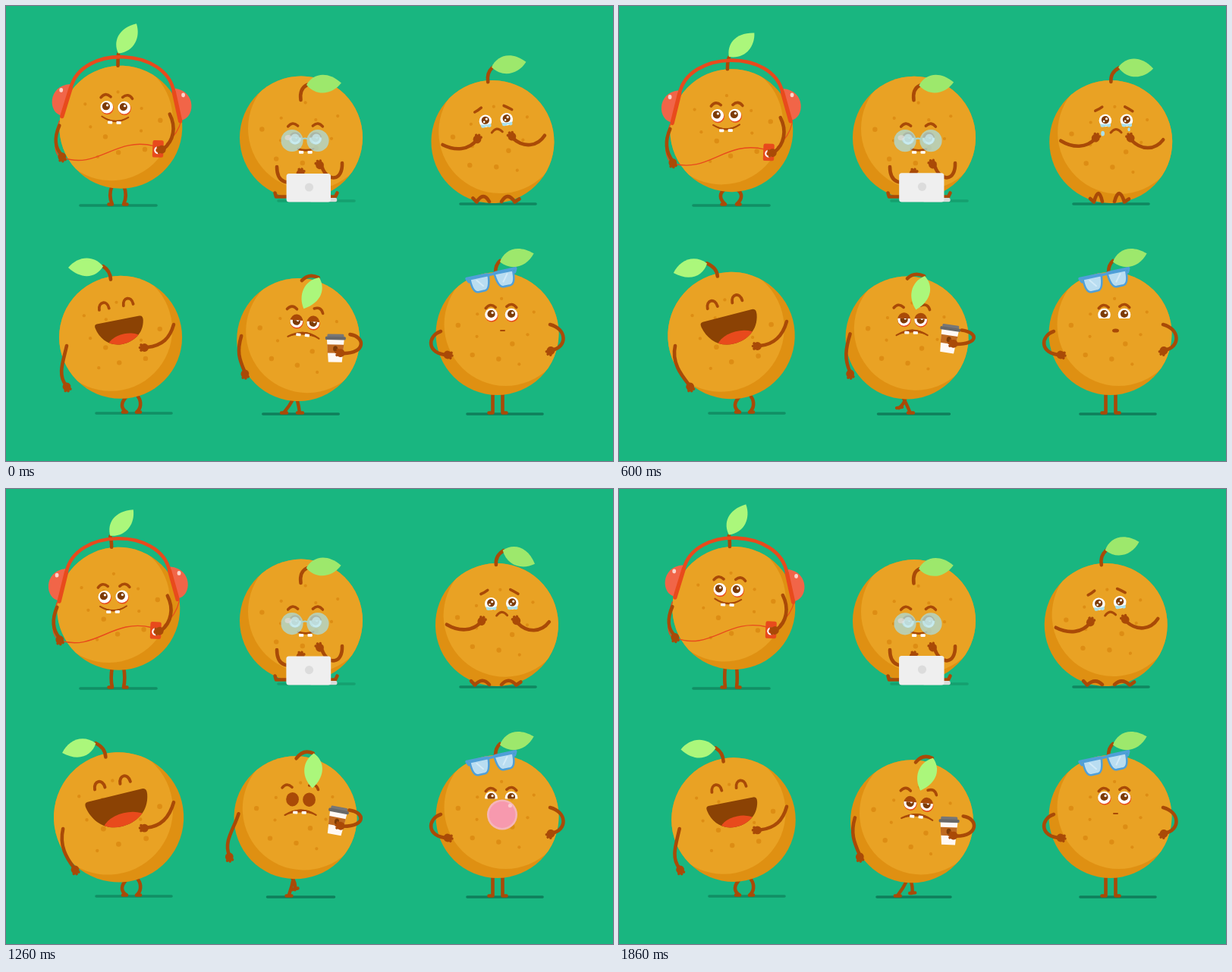
Animation, 800 px wide and 600 px high, one loop 1.92 s. Source, as an HTML page with a canvas:

```html
<!DOCTYPE html>
<html lang="en">
<head>
<meta charset="utf-8">
<title>Six oranges</title>
<style>
  html, body { margin: 0; width: 100%; height: 100%; overflow: hidden; background: #19b680; }
  canvas { display: block; width: 800px; height: 600px; }
</style>
</head>
<body>
<canvas id="stage" width="800" height="600"></canvas>
<script>
const ctx = document.getElementById('stage').getContext('2d');
const LOOP = 1920, STEP = 60, LEAD = 20;
const BOB = 480, SWAY = 960, TYPE = 640;
const BROWN = '#a94a07', RED = '#e84a1c', WHITE = '#fff', BLUE = '#4f9fd8';
const LIME = '#abf77b', GREEN = '#9de86c', TEAR = '#a9dfea';
let t = 0;

// Timing helpers
const wave = (mid, amp, period, peak = 0) => mid + amp * Math.cos(2 * Math.PI * (t - peak) / period);
const part = (from, to, time = t) => Math.min(1, Math.max(0, (time - from) / (to - from)));
const ramp = (from, to, time = t) => {
  const u = part(from, to, time);
  return u * u * (3 - 2 * u);
};
const arch = (from, to) => Math.sin(Math.PI * part(from, to));

// Drawing helpers
function line(d, width = 4.6, color = BROWN) {
  ctx.lineWidth = width;
  ctx.strokeStyle = color;
  ctx.stroke(new Path2D(d));
}
function shape(d, color) {
  ctx.fillStyle = color;
  ctx.fill(new Path2D(d));
}
function dot(x, y, rx, color, ry = rx) {
  ctx.fillStyle = color;
  ctx.beginPath();
  ctx.ellipse(x, y, rx, ry, 0, 0, 7);
  ctx.fill();
}
function box(x, y, w, h, r, color) {
  ctx.fillStyle = color;
  ctx.beginPath();
  ctx.roundRect(x, y, w, h, r);
  ctx.fill();
}
function at(x, y, deg, draw, sx = 1, sy = sx) {
  ctx.save();
  ctx.translate(x, y);
  ctx.rotate(deg * Math.PI / 180);
  ctx.scale(sx, sy);
  draw();
  ctx.restore();
}
function clipped(d, draw) {
  ctx.save();
  ctx.clip(new Path2D(d));
  draw();
  ctx.restore();
}
function mirrored(draw) {
  for (const s of [1, -1]) at(0, 0, 0, () => draw(s), s, 1);
}

// Shared parts
const ground = (x1, x2, y, color = '#118f64') => line(`M${x1 + 2},${y}H${x2 - 2}`, 3.6, color);

function body(side) {
  dot(0, 0, 81, '#df9012');
  clipped('M-81,0a81,81 0 1 1 162,0a81,81 0 1 1 -162,0', () => {
    if (side > 0) dot(-13, -10, 81, '#e9a224');
    else dot(11, -12, 81, '#e9a224');
  });
  // Freckles wind outwards by the golden angle
  for (let i = 0; i < 11; i++) {
    const a = 2.4 * i + .6, r = 24 + 3.2 * i;
    dot(-side * r * Math.cos(a), r * Math.sin(a), i % 3 ? 2.1 : 3.2, '#dd8d14');
  }
}
function leaf(x, y, deg, color) {
  at(x, y, deg, () => shape('M0,0C9,-14 28,-18 46,0C34,14 13,17 0,0Z', color));
}
function hand(x, y, deg) {
  at(x, y, deg, () => {
    dot(0, 0, 5.4, BROWN);
    line('M0,0L4.5,-3.5M0,0L6,0M0,0L4.5,3.5', 3.6);
  });
}
function eye(x, y, px = -1, py = -1, red = true) {
  if (red) dot(x + .6, y + 1.4, 8.4, RED);
  dot(x, y, 8.3, WHITE);
  dot(x + px, y + py, 5.1, '#7d3b06');
  dot(x + px + 1.6, y + py - 1.4, 1.6, WHITE);
}
const brow = (x, y, deg = 0) => at(x, y, deg, () => line('M-6.5,2Q0,-5 6.5,2', 3.6));
const teeth = (x, y) => [0, 11.5].forEach(dx => box(x + dx, y, 6.2, 3.7, 1, WHITE));

function listener() {
  const x = wave(149.2, 2.3, BOB, 450), y = wave(160.2, 4, BOB, 130), tilt = wave(0, 2.5, BOB, 450);
  ground(96, 200, 263);
  const bow = (y - 156) * 1.5;
  for (const s of [-1, 1]) {
    const hx = 147.5 + s * 7.5;
    line(`M${hx},${y + 77}Q${hx + s * bow},250 ${hx},261.5h${s * 4.5}`);
  }
  const lx = wave(142.7, 5.8, BOB, 30), ly = wave(63.5, 3.6, BOB, 140);
  const foot = x - 6.5 + (lx - 142.7) / 2;

  at(x, y, tilt, () => body(1));
  line(`M${foot},${y - 81}Q${foot},${ly + 6} ${lx},${ly + 1}`);
  leaf(lx, ly, wave(-50, 11, BOB, 190), LIME);
  at(x, y, tilt, () => {
    mirrored(() => {
      shape('M-78,-12C-97,-14 -99,-51 -69,-54Z', '#f16548');
      dot(-80.5, -45.5, 2.4, '#fbd5cb', 2.9);
      line('M-78,-11L-68,-49', 5.4, RED);
    });
    line('M-68,-49C-56,-107 56,-107 68,-49', 4.6, RED);
  });

  at(x - 7, y + wave(-20, -6, BOB), tilt, () => {
    mirrored(s => brow(-14.5 + s, -15, -6));
    eye(-11.5, 0);
    eye(11.5, 0);
    shape('M-18,12Q0,22 18,12Q0,27 -18,12Z', BROWN);
    line('M-17.5,12.5Q0,24 17.5,12.5', 2);
    teeth(-9.5, 18.2);
  });

  const hx = x - 77.5, hy = wave(202, 6, BOB, 150);
  line(`M${x - 81},${y - 8}C${x - 90},${y + 18} ${x - 88},${y + 38} ${hx},${hy}` +
    `C${x - 30},${y + 57} ${x - 8},${y + 12} ${x + 44},${y + 25}`, 1.4, RED);
  line(`M${x + 80},${y - 10}Q${x + 76},${y + 8} ${x + 60},${y + 22}`, 1.2, RED);
  line(`M${x - 81},${y - 2}C${x - 88},${y + 14} ${x - 87},${y + 28} ${hx},${hy - 3}`);
  hand(hx, hy - 1, 80);
  at(x + 49, y + 28.5, 2, () => {
    box(-7.2, -11, 14.4, 22.5, 2.5, RED);
    dot(0, 2, 5, WHITE);
    dot(0, 2, 2.9, RED);
  });
  line(`M${x + 64.5},${y - 17}C${x + 73},${y} ${x + 70},${y + 18} ${x + 56},${y + 29}`);
  hand(x + 54, y + 29.5, 170);
}

function typist() {
  const top = wave(96.2, -3.7, TYPE), ry = (254.5 - top) / 2;
  const drop = top - 92.5;
  ground(357, 461, 257, '#15a06f');
  at(389, top + ry, 0, () => body(-1), 1, ry / 81);

  const lx = wave(394, -2.4, TYPE, 380), ly = wave(107.8, 4.1, TYPE, 355);
  line(`M388.5,${124 + drop * .8}Q386.5,${109 + drop} ${lx + 1},${ly}`);
  leaf(lx, ly, wave(6, 12, TYPE, 245), GREEN);

  at(394, 177.5 + drop * .45, 0, () => {
    brow(-16, -21, -4);
    brow(17, -21, 4);
    for (const x of [-13, 14]) {
      dot(x, -3, 8.3, BROWN);
      clipped(`M${x - 9},-4h18v10h-18z`, () => eye(x, -3, 0, 0, false));
    }
    line('M-9,11Q1,14.5 11,11', 2.8);
    teeth(-8, 13.5);
    mirrored(() => dot(17, 0, 14.6, 'rgba(172,218,218,.76)'));
    line('M-4,-2Q0,-4 4,-2', 2, '#a9d3cc');
    dot(-22, -4, 4.5, 'rgba(225,220,215,.7)', 3.5);
    for (const x of [-13, 15]) dot(x, -2, 6, 'rgba(205,240,246,.65)', 7);
  });

  const left = wave(216, -4, TYPE, 290), right = wave(214.5, 6.5, TYPE, 270);
  line(`M357,${212 + drop * .2}C357,234 374,238 386,${left + 5}`);
  hand(388, left + 1, -70);
  line(`M443,${207 + drop * .3}C444,231 424,233 416,${right + 3}`);
  hand(413.5, right + 1, -120);
  line('M354.5,246.5L356,251.5H374M436.5,246.5L434,251.5H424');

  const lid = wave(221, -1, TYPE / 2, 240), half = 29.2 + (221 - lid) * .6;
  box(400, 253, half + 7, 5.3, 2, '#d9dcdb');
  box(398.8 - half, lid, half * 2, 258.5 - lid, 3.5, '#efefef');
  dot(399.5, lid + 18, 5.6, '#dcdcdc');
}

function weeper() {
  const x = wave(645.4, -4, SWAY), tilt = wave(-2.5, -2.7, SWAY), p = t % SWAY;
  ground(597, 700, 261, '#0f8760');
  at(x, 179, tilt, () => body(-1));

  const b = wave(.5, .5, BOB, 130), knee = 250 - b * 14;
  line(`M${611 + b * 10},${253 + b}L${616 + b * 10},258.5Q${627 + b * 5},${knee} 637,258`);
  line(`M653,258Q${663 - b * 4},${knee} ${674 - b * 8},258.5L${680 - b * 8},254.5`);

  at(x, 179, tilt, () => {
    const lx = wave(9.5, -2, SWAY);
    line(`M1,-79Q0,-91 ${lx + 1},-97.5`);
    leaf(lx, -98, wave(4, 20, SWAY, 345) - tilt, GREEN);
    for (const ex of [-7, 21]) {
      eye(ex, -28, 0, -1, false);
      dot(ex - 1.8, -27, 1.3, WHITE);
      shape(`M${ex - 7},-24q7,2 14,0v3.5q-2,2 -4,.5t-4,0t-5,0z`, TEAR);
    }
    line('M-20,-41Q-15,-43 -11,-46M19,-46Q23,-44 29,-40', 3.6);
    line('M0,-12Q3,-16 7,-16.5Q11,-16 14,-12', 3);
    if (p > 480 && p < 780) {
      dot(-10.5, -11 + (p - 600) * .05, 2.4, TEAR, 3.4);
      dot(24 + (p - 600) * .04, -16 + (p - 600) * .11, 1.7, TEAR, 2.5);
    }
    line('M-66,-2C-50,8 -32,8 -21,-4M69,-2C58,12 40,12 27,-2');
    hand(-20, -5, -60);
    hand(26, -4.5, -120);
  });
}

function laugher() {
  const x = wave(149.3, 1.8, SWAY), y = wave(434.5, 2.3, BOB);
  const size = wave(83.7, -2.7, BOB) / 81, tilt = wave(-2, 2, SWAY);
  ground(117, 220, 537);
  line('M159,515C152,522 150,530 159,535.5H154M174,515C179,522 178,531 172,535.5H177');
  at(x, y, tilt, () => body(1), size);

  const sx = wave(133.2, 4.8, SWAY), sy = wave(356.5, 4.2, BOB);
  const lx = wave(121, 7, SWAY), ly = wave(338.8, 4.5, BOB, 10);
  line(`M${sx},${sy}Q${sx - .5},${ly + 6} ${lx},${ly}`);
  leaf(lx, ly, wave(168, 10.5, BOB, 450), LIME);

  at(x, y, tilt, () => {
    at(-6.5, -43.8, -10, () => mirrored(() => line('M9.7,4C10.2,-7.5 22.2,-7.5 22.7,4', 3.8)));
    const open = wave(75, -11, BOB) / 64;
    at(-2.5, -20.5 - (open - 1) * 14, -11, () => {
      const mouth = 'M-29,-2.5L28,-2.5Q33,-2.5 32,4C29,22 14,30 -1,30C-18,30 -29,18 -32,3Q-33,-2.5 -29,-2.5Z';
      shape(mouth, '#8b4204');
      clipped(mouth, () => dot(4, 32, 25, RED, 15));
    }, open / size);
  }, size);

  const ax = wave(76.5, 3.5, SWAY), hx = wave(88, -8, SWAY);
  line(`M${ax},448C${ax - 5},470 ${hx - 12},486 ${hx - 1},500`);
  hand(hx, 502, 70);
  const ay = wave(416, 4, BOB), hy = wave(448, 2, BOB);
  line(`M221,${ay}C216,${ay + 18} 206,${hy - 2} 186,${hy}`);
  hand(182.5, hy + .5, 180);
}

function walkerLeg(x, y, shift) {
  const a = 2 * Math.PI * (t + shift) / SWAY;
  const fx = 376.5 + 10.5 * Math.cos(a), lift = Math.max(0, -Math.sin(a)) * 9, fy = 536.5 - lift;
  const kx = (x + fx) / 2 + 1 + lift * .5;
  line(`M${x},${y}Q${kx},${(y + fy) / 2 + 1} ${fx},${fy}M${fx - 3},${fy}l7,${-lift * .2}`, 4.4);
}

function sleeper() {
  const x = wave(382, 4, BOB, 430), y = wave(436.5, 3.7, BOB, 20), tilt = wave(2.5, 3, BOB, 450);
  const half = wave(48.5, 3.2, BOB, 10), p = t % SWAY;
  ground(388.5 - half, 388.5 + half, 538, '#0f7f5b');
  walkerLeg(x - 6, y + 77, 480);
  walkerLeg(x - 2, y + 77, 0);
  at(x, y, tilt, () => {
    body(-1);
    const lid = 17 * (.42 + .58 * (ramp(60, 200, p) - ramp(320, 420, p))) - 8.5;
    for (const ex of [-4.5, 17.5]) {
      dot(ex, -24, 8.4, BROWN, 9.2);
      if (lid < 7.5) clipped(`M${ex - 10},${lid - 24}h20v20h-20z`, () => eye(ex, -24, 0, 0));
    }
    brow(-12, -41.5, -4);
    brow(24, -42, 24);
    shape('M-15,-2.5Q7,-19 28,-3.5Q7,-11 -15,-2.5Z', BROWN);
    line('M-14,-3Q7,-16 27,-4', 2.2);
    teeth(-3.5, -8.6);
  });

  const ax = x - 75, ay = y - 5, hx = wave(305.5, 12.5, SWAY, 850);
  line(`M${ax},${ay}C${ax - 6},${ay + 20} ${hx - 8},465 ${hx},483`);
  hand(hx, 485, 80);

  const cy = wave(427.5, 9.6, BOB, 455);
  at(wave(437, -2.6, BOB), cy, wave(7.3, -6.3, BOB, 465), () => {
    shape('M-11.5,2H11.5L9,33H-9Z', '#fff8f3');
    shape('M-11,10H11L10.2,21H-10.2Z', '#bf6a20');
    dot(0, 15.5, 3, '#7d3b06', 3.8);
    box(-11, -4, 22, 5, 1.5, '#777');
    box(-13.5, -.5, 27, 4.2, 1.5, '#686868');
  });
  const sx = 452.5 + (x - 382) * .3, sy = wave(427.5, 5.6, BOB), hy = cy + 21.5;
  line(`M${sx},${sy}C474,${sy + 3} 474,${hy} 445,${hy}`);
  hand(441, hy - .5, 190);

  const bx = x + wave(2, 3.2, BOB, 440);
  const lx = x + wave(25, 3, BOB, 440), ly = y + wave(-83, 1.9, BOB, 80);
  line(`M${bx},${y - 78}Q${bx + 9},${ly - 6} ${lx - 1},${ly}`);
  leaf(lx, ly, wave(103, 13.5, BOB, 10), LIME);
}

function blower() {
  const POP = 1420;
  const hop = -6.5 * arch(POP, 1710), air = -hop;
  const fling = ramp(POP, 1540) - ramp(1600, 1790), spread = 9 * arch(POP, 1600);
  const y = 432 + hop;
  ground(606, 709, 538, '#0f7f5b');
  for (const s of [-1, 1]) {
    line(`M${648 + s * 6.5},${y + 78}V${536.5 - air}l${s * 5},${-air * .3}`);
  }
  at(647.5, y, 0, () => body(-1));
  line(`M${645 + fling},${y - 80}Q645,${341 - fling * 4} ${651 - fling * 3},${336 - fling * 5}`);
  leaf(651 - fling * 3, 337.5 - fling * 6, -14 - fling * 19, GREEN);

  const hx = 582 - fling * 3, hy = 460 + fling * 3, out = spread - fling * 3;
  line(`M573,${y - 3}C${555 - out},${y + 3} ${554 - out},${y + 27} ${hx},${hy}`);
  hand(hx, hy, 10);
  line(`M717,${y - 12}C${740 + out},${y - 6} ${740 + out},${y + 18} ${719 + fling * 4},454`);
  hand(718 + fling * 5, 454.5, 130);

  // Cheeks push the lower lids up while blowing
  const cut = 10 - 8.5 * (ramp(100, 1000) - ramp(POP, 1500));
  for (const ex of [639.5, 666]) {
    const ey = 407 + hop;
    clipped(`M${ex - 10},${ey - 10}h20v${10 + cut}h-20z`, () => eye(ex, ey, 0, -1, air < 2 && cut > 8));
  }
  brow(638.5, 396 + hop, -6);
  brow(666.5, 395 + hop, 6);

  const r = t <= POP ? (t - 680) / 29 : 0;
  if (t < 540 || t > POP) line(`M652,${428 + hop}h5`, 2);
  else if (r < 4) dot(654.5, 428, 4.5, BROWN, 2.6);
  if (r > 0) {
    dot(654, 429.5, r, '#f5b5b9');
    dot(654, 429.5, r * .87, '#f799ae');
    if (r > 16) dot(654 + r * .52, 429.5 - r * .6, r * .13, '#fbc9cf');
  }

  at(641, 360.5 - fling * 16.5, -12 + fling * 17, () => {
    mirrored(() => at(16.5, 1, 0, () => {
      const lens = 'M-12.5,-7.5H12.5Q12.5,11 5,11.5H-4Q-11,11 -12.5,-7.5Z';
      shape(lens, '#b9ddf1');
      line('M-3,5L4,-4', 2, '#d3ebf8');
      line(lens, 2.6, BLUE);
      line('M16.5,-8l-2,4', 3, BLUE);
    }));
    line('M-33,-8H-6Q0,-5 6,-8H33', 3.6, BLUE);
  });
}

const cast = [listener, typist, weeper, laugher, sleeper, blower];

function draw() {
  t = Math.floor((performance.now() + LEAD) % LOOP / STEP) * STEP;
  ctx.lineCap = ctx.lineJoin = 'round';
  ctx.fillStyle = '#19b680';
  ctx.fillRect(0, 0, 800, 600);
  cast.forEach(paint => paint());
  requestAnimationFrame(draw);
}
draw();
</script>
</body>
</html>
```
